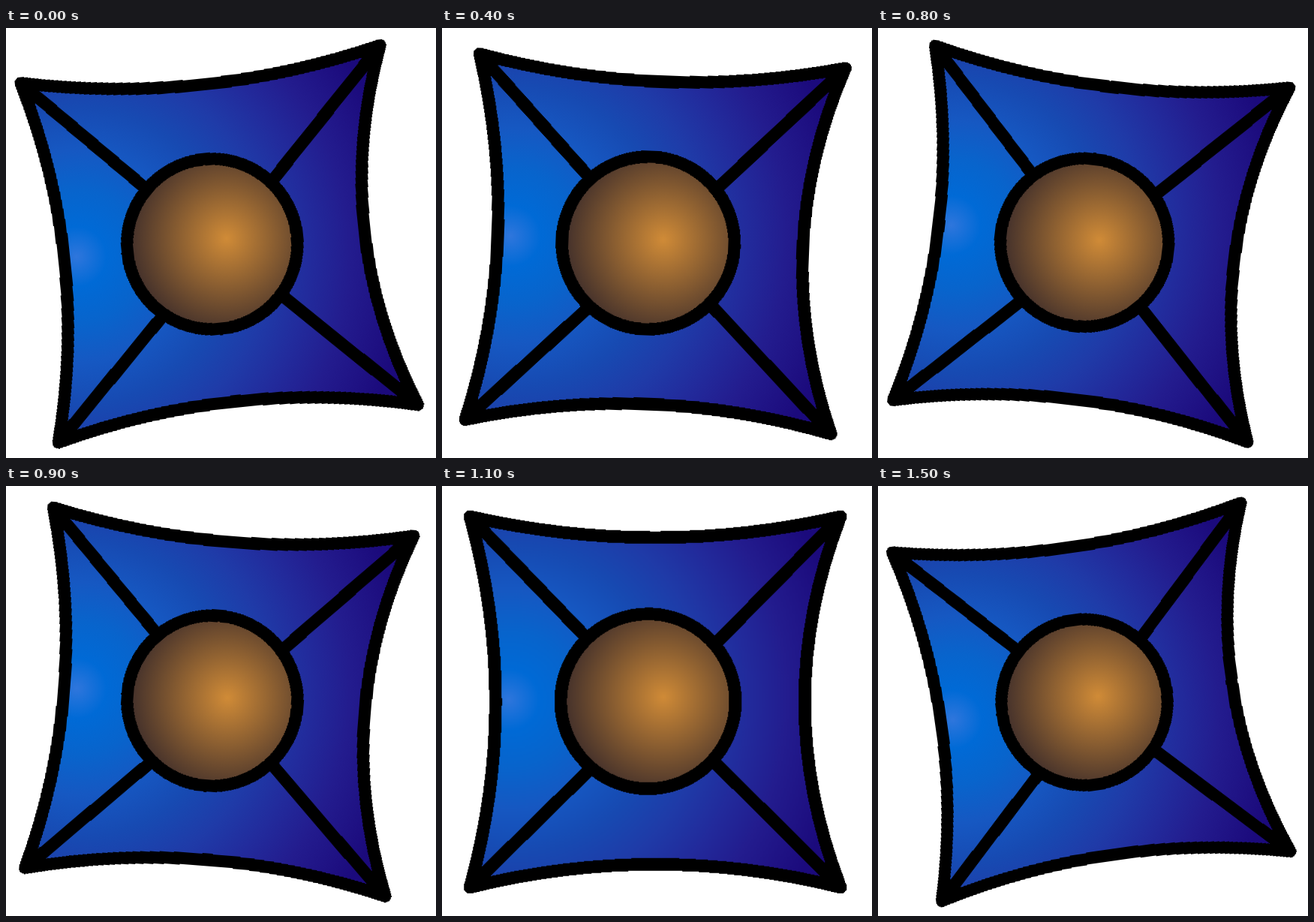
Write an HTML page that moves like this. It is 573 px wide and 573 px high and loops after 1.6 s.

```html
<!DOCTYPE html>
<html lang="en">
<head>
<meta charset="utf-8">
<title>Swaying cushion</title>
<style>
  html, body {
    margin: 0;
    width: 100%;
    height: 100%;
    overflow: hidden;
    background: #fff;
  }
  svg {
    display: block;
    width: 573px;
    height: 573px;
  }
  .cushion {
    stroke: #000;
    stroke-width: 16.8;
    stroke-linecap: round;
    stroke-linejoin: round;
    shape-rendering: crispEdges;
    transform-origin: 0 0;
    animation: sway 1600ms infinite;
  }
  /* Each swing advances in 100 ms steps. */
  @keyframes sway {
    0%     { transform: rotate(-6deg) scale(.975); animation-timing-function: steps(3); }
    18.75% { transform: rotate(0deg) scale(1);     animation-timing-function: steps(4); }
    43.75% { transform: rotate(9deg) scale(.95);   animation-timing-function: steps(4); }
    68.75% { transform: rotate(0deg) scale(1);     animation-timing-function: steps(4); }
    93.75% { transform: rotate(-8.1deg) scale(.95); animation-timing-function: steps(1); }
    100%   { transform: rotate(-6deg) scale(.975); }
  }
</style>
</head>
<body>
<svg viewBox="0 0 573 573">
  <defs>
    <radialGradient id="cloth" gradientUnits="userSpaceOnUse" cx="-196" cy="-3" r="455">
      <stop offset="0" stop-color="#2f76dc"/>
      <stop offset=".09" stop-color="#006ad6"/>
      <stop offset=".2" stop-color="#0864cc"/>
      <stop offset=".32" stop-color="#1658c2"/>
      <stop offset=".45" stop-color="#174ab2"/>
      <stop offset=".58" stop-color="#1f3ba8"/>
      <stop offset=".7" stop-color="#222b9c"/>
      <stop offset=".82" stop-color="#231c8e"/>
      <stop offset=".92" stop-color="#1f1284"/>
      <stop offset="1" stop-color="#1b0a7c"/>
    </radialGradient>
    <radialGradient id="ball" gradientUnits="userSpaceOnUse" cx="10.5" cy="-6.5" r="132">
      <stop offset="0" stop-color="#d08b37"/>
      <stop offset="1" stop-color="#44312b"/>
    </radialGradient>
  </defs>
  <g transform="translate(284.2 287.7)">
    <g class="cushion">
      <path fill="url(#cloth)" d="M-247-247Q0-191 247-247Q151.4 0 247 247Q0 185.8-247 247Q-178.6 0-247-247Z"/>
      <path fill="none" d="M-247-247L-9.5 0M247-247L0 4L-247 247M247 247L0 2"/>
      <circle fill="url(#ball)" cx="-9.6" cy="-.8" r="116.5"/>
    </g>
  </g>
</svg>
</body>
</html>
```
